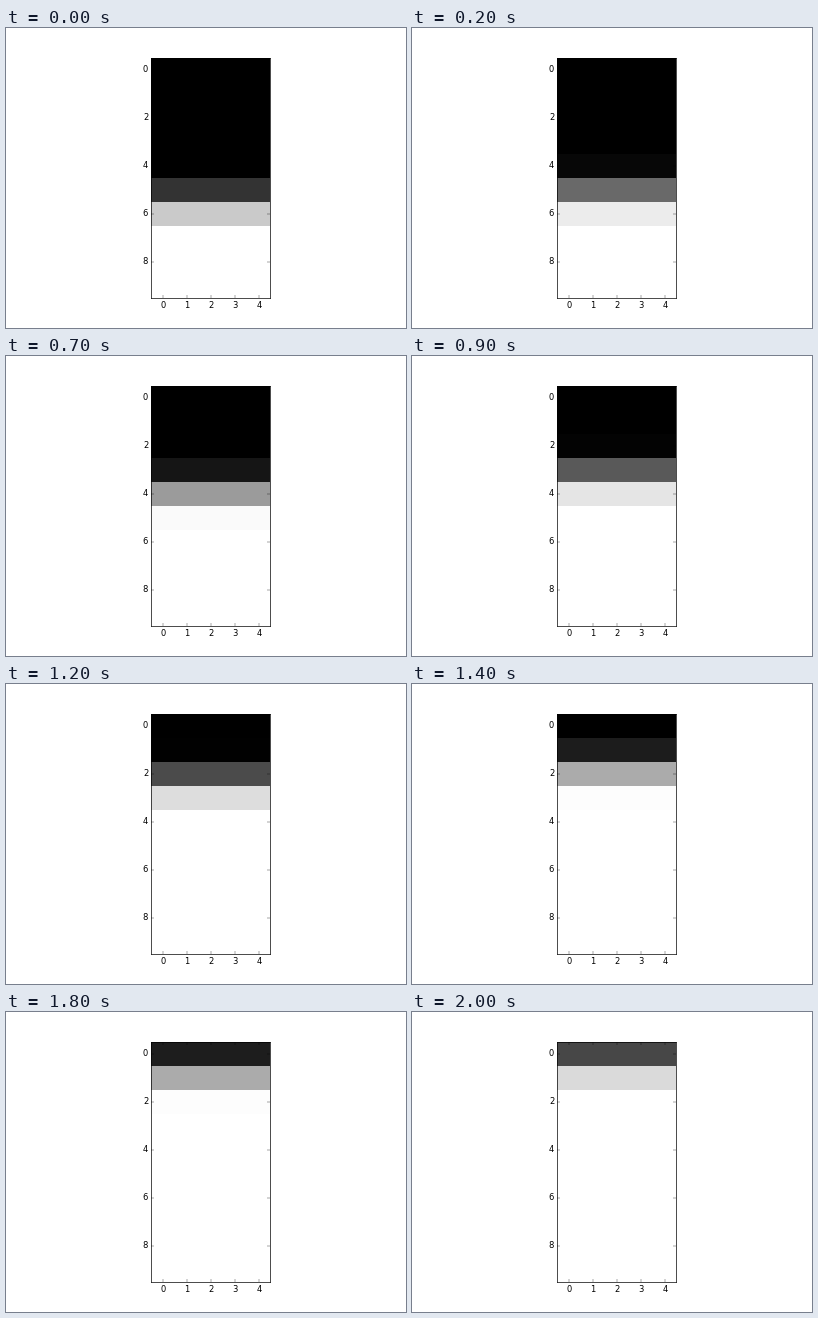
A matplotlib script that plays this animation: 400x300 px, repeating every 2.1 s.

```python
import numpy as np
import matplotlib.pyplot as plt
from matplotlib.animation import FuncAnimation

W, H, DPI = 400, 300, 50
ROWS, COLS, CELL = 10, 5, 24
FRAMES, INTERVAL = 21, 100

plt.rcParams.update({
    "font.family": "DejaVu Sans",
    "font.size": 12,
    "text.hinting": "auto",
    "axes.linewidth": 1.0,
    "ytick.alignment": "center",
})


def edge(i):
    """Row where the brightness crosses one half."""
    return 2.93 - 3.06 * np.sin((i - 10) / 10)


def shades(i):
    rows = np.arange(ROWS)
    v = 1 / (1 + np.exp(-2.5 * (rows - edge(i))))
    v = np.clip((v - 0.03) / 0.94, 0, 1)
    return np.repeat(v[:, None], COLS, axis=1)


fig = plt.figure(figsize=(W / DPI, H / DPI), dpi=DPI, facecolor="white")

# The right border lies on the last pixel column of the image
width = COLS * CELL - 1
ax = fig.add_axes([145 / W, 30 / H, width / W, ROWS * CELL / H])
image = ax.imshow(shades(0), cmap="gray", vmin=0, vmax=1,
                  interpolation="nearest", aspect="auto")
ax.set_xticks(range(COLS))
ax.set_yticks(range(0, ROWS, 2))
ax.set_xlim(-0.5, width / CELL - 0.5)
ax.tick_params(direction="in", length=4, width=0.5, pad=4,
               top=True, right=True)


def update(i):
    image.set_data(shades(i))
    return [image]


anim = FuncAnimation(fig, update, frames=FRAMES, interval=INTERVAL,
                     repeat=True, repeat_delay=0)
plt.show()
```
